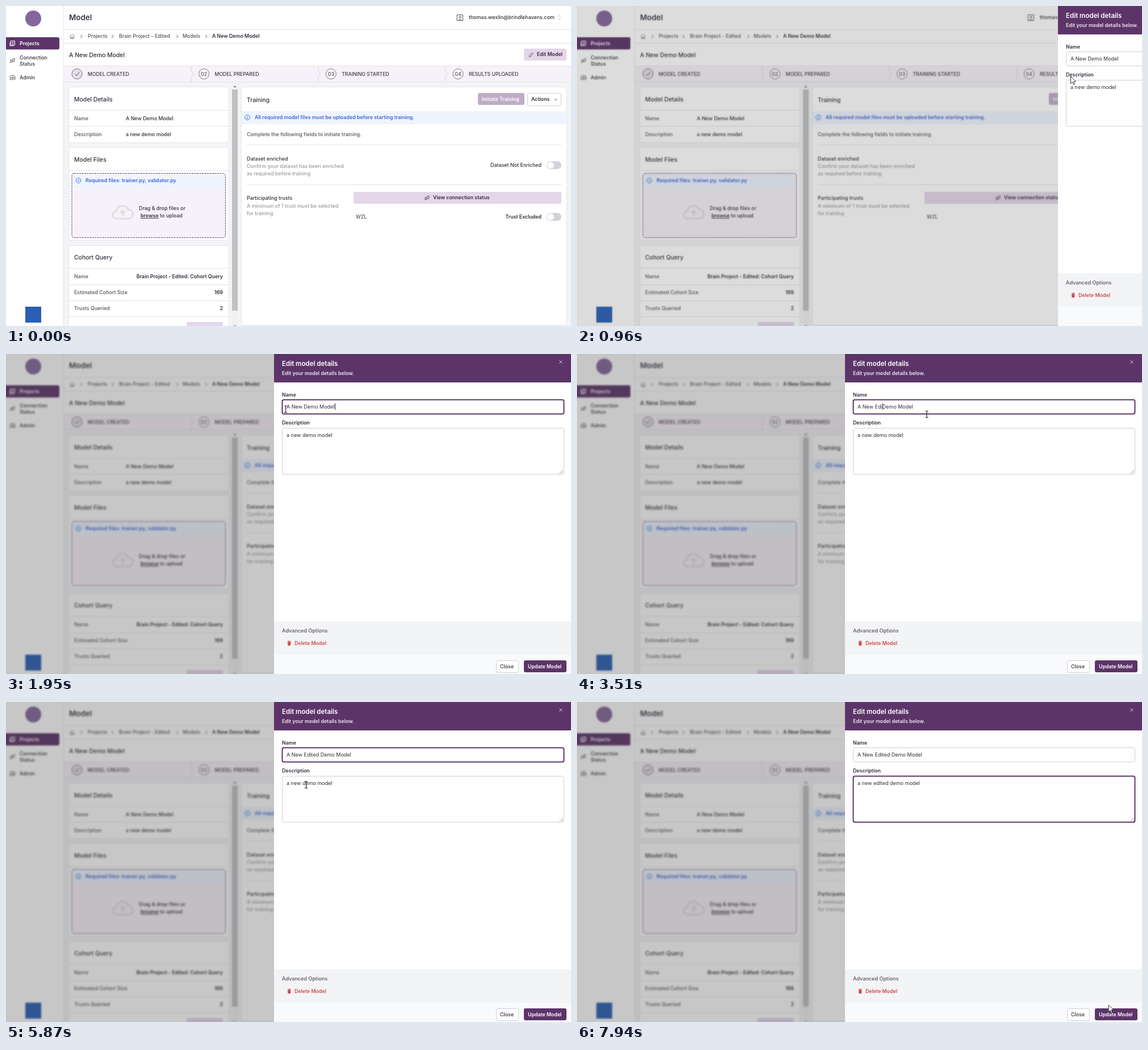
Write an HTML page that moves like this. It is 995 px wide and 563 px high and loops after 8000 ms.

```html
<!DOCTYPE html>
<html lang="en">
<head>
<meta charset="utf-8">
<title>Edit model details</title>
<style>
  html, body { margin: 0; width: 100%; height: 100%; overflow: hidden; background: #fff; }
  svg { display: block; }
  text { font: 500 8.9px Inter, sans-serif; fill: #57525d; white-space: pre; }
  .dark { fill: #332e3a; }
  .mute { fill: #9b99a1; }
  .bold { font-weight: 600; font-size: 8.8px; fill: #332e3a; }
  .blue { font-weight: 600; font-size: 8.9px; fill: #4263d6; }
  .head { font-size: 10.4px; fill: #332e3a; }
  .title { font-weight: 600; font-size: 13.4px; fill: #3b3542; }
  .step { font-size: 8.7px; fill: #3f3946; }
  .white { font-weight: 600; font-size: 8.8px; fill: #fff; }
  .panelTitle { font-weight: 600; font-size: 11.5px; fill: #fff; }
  .panelNote { font-weight: 600; font-size: 8.8px; fill: #eee3f1; }
  .options { font-size: 9.1px; }
  .danger { font-weight: 600; font-size: 8.8px; fill: #d04a4c; }
  .value { font-weight: 400; font-size: 9px; fill: #332e3a; }
  .end { text-anchor: end; }
  .mid { text-anchor: middle; }
  .icon { fill: none; stroke: #57525d; stroke-linecap: round; stroke-linejoin: round; }
</style>
</head>
<body>
<svg id="stage" width="995" height="563" viewBox="0 0 995 563"></svg>
<script>
const PURPLE = '#5d3469', LILAC = '#e5d6ea', LINE = '#e3e3e8';
const LOOP = 8000, PANEL_WIDTH = 523;

const text = (x, y, s, cls = '') => `<text x="${x}" y="${y}" class="${cls}">${s}</text>`;
const rect = (x, y, w, h, fill, r = 0, extra = '') =>
  `<rect x="${x}" y="${y}" width="${w}" height="${h}" rx="${r}" fill="${fill}" ${extra}/>`;
const frame = (x, y, w, h, extra = '') =>
  rect(x + .5, y + .5, w - 1, h - 1, '#fff', 3, `stroke="#cfcfd6" ${extra}`);
const hline = (x, y, w) => rect(x, y, w, 1, LINE);
const icon = (d, style = '') => `<path class="icon" d="${d}" style="${style}"/>`;
const card = (y, h, x = 111, w = 281) =>
  rect(x, y + 1, w, h, '#d9d9df', 4) + rect(x - .5, y - .5, w + 1, h + 1, '#fff', 4, 'stroke="#e6e6eb"');
const chevron = (x, y) => icon(`M${x - 1.5} ${y - 2.5}l2.5 2.5l-2.5 2.5`);
const info = (x, y) => `<circle cx="${x}" cy="${y}" r="4.5" fill="#dbeafe" stroke="#4a86e0"/>`
  + icon(`M${x} ${y}v2M${x} ${y - 2}v.1`, 'stroke:#2f6fd0');
const toggle = y => rect(952, y, 26, 14, '#d3d2d9', 7) + `<circle cx="959" cy="${y + 7}" r="6" fill="#fff"/>`;
const plug = (x, y) => icon(`M${x - 4} ${y + 4}l2-2M${x - 2} ${y - 1}l3 3q-2 2-4 0q-1-2 1-3zM${x} ${y - 2}q2-2 4 0q1 2-1 4zM${x + 3} ${y - 3}l1.5-1.5`);

const sidebar = () => rect(0, 0, 101, 563, '#fff') + rect(101, 0, 1, 563, LINE)
  + '<circle cx="48" cy="22" r="14" fill="#84669c"/>'
  + rect(-4, 55, 98, 21.5, PURPLE, 3)
  + icon('M8.5 61.5h7v7h-7zM7 63.5v6.5h6.5M10.5 64h3M10.5 66h3', 'stroke:#fff')
  + text(24, 69, 'Projects', 'white')
  + plug(11, 96) + text(24, 94, 'Connection', 'dark') + text(24, 105, 'Status', 'dark')
  + icon('M7 126q0-4 4.5-4t4.5 4v3M9 130v-4q2.5-3 5 0v4M11.5 126v4M7 128v1.5')
  + text(24, 129, 'Admin', 'dark')
  + rect(34, 529, 28, 28, '#2a5fb4');

const header = () => {
  let s = rect(102, 0, 893, 105, '#fff') + hline(102, 41, 893) + hline(102, 65, 893)
    + text(111, 25, 'Model', 'title')
    + icon('M794.5 15.5h10v10h-10zM797 25q2.5-4 5 0') + '<circle cx="799.5" cy="19.5" r="1.7" class="icon"/>'
    + text(815, 23, 'thomas.wexlin@brindlehavens.com', 'dark')
    + icon('M973.5 18l1.5-1.5l1.5 1.5M973.5 22l1.5 1.5l1.5-1.5', 'stroke:#aaa')
    + icon('M112.5 53.5l4-4l4 4M113.5 53v4.5h6v-4.5M115.5 57v-2.5h2v2.5', 'stroke:#8b8791')
    + [133, 188, 302, 353].map(x => chevron(x, 53.5)).join('')
    + text(144, 56, 'Projects') + text(199, 56, 'Brain Project - Edited') + text(311, 56, 'Models')
    + text(363, 56, 'A New Demo Model', 'bold')
    + text(111, 90, 'A New Demo Model', 'head')
    + rect(912, 75, 75, 21, LILAC, 3)
    + icon('M921.5 89l.5-2.5l4.5-4.5l2 2l-4.5 4.5z') + text(935, 88, 'Edit Model', 'bold')
    + rect(102, 105, 893, 29, '#f7f2f9') + hline(102, 105, 893) + hline(102, 133, 893);
  ['MODEL CREATED', 'MODEL PREPARED', 'TRAINING STARTED', 'RESULTS UPLOADED'].forEach((name, i) => {
    const x = 125 + i * 223.7;
    s += `<circle cx="${x}" cy="119.5" r="9" fill="${i ? '#fbf8fc' : '#e3e0e8'}" stroke="#77717e"/>`
      + (i ? text(x, 122.7, '0' + (i + 1), 'mid') : icon('M121 119.5l3 3l5-6'))
      + text(x + 18.8, 122.7, name, 'step');
    if (i) s += icon(`M${x - 22.5} 106v8l4 5.5l-4 5.5v8`, 'stroke:#dcd3e0');
  });
  return s;
};

const row = (y, label, value, cls) => text(120, y, label) + text(cls ? 382 : 211, y, value, cls || 'dark');

const details = () => card(143, 97) + text(120, 168, 'Model Details', 'head') + hline(111, 183, 281)
  + row(201, 'Name', 'A New Demo Model') + hline(111, 211, 281)
  + row(229, 'Description', 'a new demo model')
  + card(249, 163) + text(120, 273.5, 'Model Files', 'head') + hline(111, 289, 281)
  + rect(116, 294.5, 270.5, 113, '#f7f2f9', 4) + rect(117, 295, 269, 26, '#eff5ff', 3)
  + rect(116, 294.5, 270.5, 113, 'none', 4, `stroke="${PURPLE}" stroke-dasharray="3 1.5"`)
  + info(127.5, 307) + text(140, 310, 'Required files: trainer.py, validator.py', 'blue')
  + icon('M196 374h-1a6.5 6.5 0 0 1-1-13a11 11 0 0 1 21-3a8 8 0 0 1 1 16zM205.500 369v-8M202 363.5l3.5-3.500l3.500 3.500',
    'stroke:#e0dee3;stroke-width:3')
  + text(234, 358.5, 'Drag &amp; drop files or', 'dark')
  + text(237, 372, '<tspan font-weight="600" text-decoration="underline">browse</tspan> to upload', 'dark')
  + card(422, 150) + text(120, 446, 'Cohort Query', 'head') + hline(111, 461, 281)
  + row(479, 'Name', 'Brain Project - Edited: Cohort Query', 'bold end') + hline(111, 490, 281)
  + row(507, 'Estimated Cohort Size', '169', 'bold end') + hline(111, 518, 281)
  + row(535, 'Trusts Queried', '2', 'bold end') + hline(111, 546, 281)
  + rect(318, 556, 64, 20, LILAC, 3)
  + rect(398, 136, 11, 427, '#f1f1f2') + rect(398, 147, 10, 389, '#c1c1c3')
  + '<path d="M400.5 143l2.5-3l2.5 3zM400.5 562h5l-2.5 2z" fill="#777"/>';

const training = () => card(143, 418, 415, 572) + text(424, 169, 'Training', 'head')
  + rect(831, 153, 82, 21, '#bfadc6', 3) + text(838, 166.5, 'Initiate Training', 'white')
  + frame(918, 153, 60, 23) + text(925, 167, 'Actions', 'bold') + icon('M966 164l2 2l2-2')
  + rect(415, 185, 572, 23, '#eff5ff') + info(425, 196)
  + text(438, 199, 'All required model files must be uploaded before starting training.', 'blue')
  + text(424, 229, 'Complete the following fields to initiate training.') + hline(424, 244, 554)
  + text(424, 272, 'Dataset enriched', 'dark')
  + text(424, 285, 'Confirm your dataset has been enriched', 'mute')
  + text(424, 298, 'as required before training', 'mute')
  + text(943, 283, 'Dataset Not Enriched', 'dark end') + toggle(273) + hline(424, 314, 554)
  + text(424, 341, 'Participating trusts', 'dark')
  + text(424, 354.5, 'A minimum of 1 trust must be selected', 'mute')
  + text(424, 368, 'for training', 'mute')
  + rect(612, 327, 366, 21, LILAC, 3) + plug(741, 337.5) + text(752, 340, 'View connection status', 'bold')
  + text(616, 373.5, 'WZL') + text(943, 373.5, 'Trust Excluded', 'bold end') + toggle(364);

const panel = () => rect(472, 0, 530, 563, '#fff') + rect(472, 0, 530, 50, PURPLE)
  + text(486, 21, 'Edit model details', 'panelTitle')
  + text(486, 37, 'Edit your model details below.', 'panelNote')
  + icon('M974.5 11.5l5 5m0-5l-5 5', 'stroke:#cdb8d4')
  + text(486, 74.5, 'Name', 'bold') + frame(486, 80, 497, 26, 'id="nameBox"')
  + text(486, 124, 'Description', 'bold') + frame(486, 130, 497, 82, 'id="descBox"')
  + icon('M975 210l6-6M978.5 210l2.5-2.5', 'stroke:#888;stroke-width:.8')
  + '<text id="name" x="494" y="96" class="value"/><text id="desc" x="494" y="146" class="value"/>'
  + '<rect id="caret" width="1" height="11" fill="#222"/>'
  + rect(472, 470, 530, 59, '#f3f4f6') + text(486, 490, 'Advanced Options', 'options')
  + '<path d="M495.5 505.5h6.5v1h-6.5zM497.5 504.5h2.5v1h-2.5zM496 507h5.5l-.5 6h-4.5z" fill="#d04a4c"/>'
  + text(508, 512, 'Delete Model', 'danger')
  + rect(472, 529, 530, 34, '#f9fafb') + frame(863, 539, 40, 22) + text(870, 553, 'Close', 'dark')
  + rect(912, 539, 75, 21, PURPLE, 3) + text(919, 552.5, 'Update Model', 'white');

const $ = id => document.getElementById(id);
$('stage').innerHTML = `<filter id="blur" x="0" y="0" width="100%" height="100%" color-interpolation-filters="sRGB"><feGaussianBlur stdDeviation="1.8"/></filter>
  <g id="page">${rect(-20, -20, 1035, 603, '#f3f4f6')}${sidebar()}${details()}${training()}${header()}</g>
  <g id="veil"><use href="#page" filter="url(#blur)"/>${rect(0, 0, 995, 563, '#404040', 0, 'opacity=".29"')}</g>
  <g id="panel">${panel()}</g>
  <path id="arrow" d="M0 0v12.5l3-2.8l2 4.6l2-.9l-2-4.5h4z" fill="#fff" stroke="#222" stroke-width=".9"/>
  <path id="beam" d="M-2.5-6q2.5 0 2.5 1.5q0-1.5 2.5-1.5M0-4.5v9M-2.5 6q2.5 0 2.5-1.5q0 1.5 2.5 1.5" fill="none" stroke="#222" stroke-width="1.1"/>`;

// Pointer way points: time, x, y
const path = [
  [70, 930, 563], [550, 950, 88], [820, 945, 92], [960, 870, 124], [1170, 764, 124], [1400, 600, 112],
  [1670, 492.5, 97], [2050, 492.5, 97], [2300, 524, 94], [2580, 616, 104], [2980, 616, 106], [3980, 616, 106],
  [4040, 614, 107], [4650, 614, 108], [5060, 416, 133], [5150, 398, 138], [5460, 470, 138], [5850, 524, 144],
  [6290, 620.5, 178], [7160, 620.5, 178], [7510, 983, 3], [7930, 936, 533], [LOOP, 936, 533]];
// Times at which the caret is blinked off
const caretOff = [[0, 1740], [2980, 3110], [4320, 5880], [7400, LOOP]];

const clamp = v => Math.max(0, Math.min(1, v));
const typed = (t, start, gap) => Math.max(0, Math.min(7, 1 + Math.floor((t - start) / gap)));

function pointer(t) {
  const i = Math.max(1, path.findIndex(p => p[0] > t));
  const [a, b] = [path[i - 1], path[i]];
  const k = clamp((t - a[0]) / (b[0] - a[0]));
  return [a[1] + (b[1] - a[1]) * k, a[2] + (b[2] - a[2]) * k];
}

function setFocus(box, on) {
  box.style.stroke = on ? PURPLE : '#cfcfd6';
  box.style.strokeWidth = on ? 2 : 1;
}

function render(t) {
  const slide = 1 - (1 - clamp((t - 893) / 445)) ** 2;
  $('panel').setAttribute('transform', `translate(${Math.round(PANEL_WIDTH * (1 - slide))})`);
  $('panel').style.display = slide ? '' : 'none';
  $('veil').style.opacity = clamp((t - 800) / 260);

  const nameKeys = typed(t, 3310, 88), descKeys = typed(t, 6420, 80);
  $('name').textContent = 'A New ' + 'Edited '.slice(0, nameKeys) + 'Demo Model';
  $('desc').textContent = 'a new ' + 'edited '.slice(0, descKeys) + 'demo model';

  const inDesc = t >= 5880;
  setFocus($('nameBox'), t >= 1740 && !inDesc);
  setFocus($('descBox'), inDesc);
  const field = inDesc ? $('desc') : $('name');
  const index = inDesc ? 6 + descKeys : t < 2300 ? 16 : 6 + nameKeys;
  $('caret').setAttribute('x', Math.round(494 + field.getSubStringLength(0, index)));
  $('caret').setAttribute('y', inDesc ? 137 : 87);
  $('caret').style.display = caretOff.some(([a, b]) => t >= a && t < b) ? 'none' : '';

  const [x, y] = pointer(t);
  const overField = t > 1300 && x > 486 && x < 983 && (y > 80 && y < 106.5 || y > 130 && y < 212);
  for (const [id, on] of [['arrow', !overField], ['beam', overField]]) {
    $(id).setAttribute('transform', `translate(${x} ${y})`);
    $(id).style.display = on && t >= 70 ? '' : 'none';
  }
}

function tick() {
  render(performance.now() % LOOP);
  requestAnimationFrame(tick);
}
tick();
</script>
</body>
</html>
```
